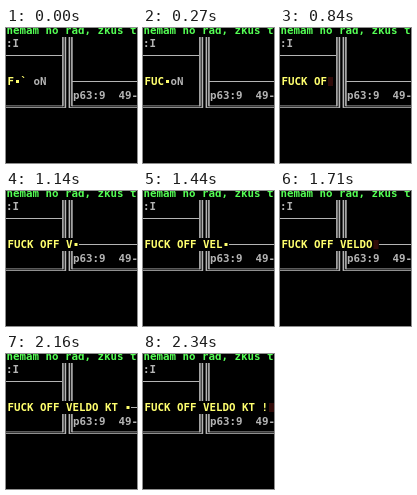
Recreate the animation shown at these times as an HTML page with a canvas. Size 131 by 135 pixels, loop 2.37 s.

```html
<!DOCTYPE html>
<html lang="en">
<head>
<meta charset="utf-8">
<style>
html, body { margin: 0; overflow: hidden; background: #000; }
canvas { display: block; }
</style>
</head>
<body>
<canvas id="screen" width="131" height="135"></canvas>
<script>
const ctx = document.getElementById('screen').getContext('2d');
const LOOP = 2370, TICK = 30, PITCH = 6.5, LEFT = 1.5;
const GRAY = '#b4b4b4', GREEN = '#55ff55', YELLOW = '#ffff6e', EMBER = '#300a08';
const MESSAGE = 'FUCK OFF VELDO KT !';
const CELLS_PER_TICK = 0.235, FIRST_CELL = 1.08;

const cellX = i => LEFT + i * PITCH;

function box(x, y, w, h, color = GRAY) {
  ctx.fillStyle = color;
  ctx.fillRect(x, y, w, h);
}

function print(text, x, baseline, color) {
  ctx.font = 'bold 10.8px "DejaVu Sans Mono", monospace';
  ctx.fillStyle = color;
  [...text].forEach((char, i) => ctx.fillText(char, x + i * PITCH, baseline));
}

function drawPanels() {
  box(0, 0, 131, 135, '#000');
  print('nemam ho rad, zkus t', 0.5, 6, GREEN);
  print(':I', 0, 19, GRAY);
  print('p63:9  49-', 67, 71, GRAY);

  box(0, 27, 56, 1);
  box(66, 53, 65, 1);
  // Double borders of the two neighbouring panels
  for (const x of [56.1, 65.1]) box(x, 9, 1.6, 69.3);
  for (const x of [58.6, 62.6]) box(x, 9, 1.6, 70.9);
  box(0, 77.5, 57, 0.8);
  box(0, 79.1, 60, 0.8);
  box(66, 77.5, 65, 0.8);
  box(63, 79.1, 68, 0.8);

  print('`', cellX(2), 57, YELLOW);
  print('oN', cellX(4), 57, GRAY);
}

// The cursor wipes the row as it advances: a bright dot that dies to an ember
function drawMessage(ticks) {
  const position = FIRST_CELL + ticks * CELLS_PER_TICK;
  const cursor = Math.floor(position);
  const x = cellX(cursor);
  box(0, 47, Math.round(x + PITCH), 13, '#000');
  print(MESSAGE.slice(0, cursor), LEFT, 57, YELLOW);
  if (position - cursor < 0.4) box(x + 2, 52, 3, 3, YELLOW);
  else box(x + 1, 49, 5, 9, EMBER);
}

function frame() {
  drawPanels();
  drawMessage(Math.floor((performance.now() % LOOP) / TICK));
  requestAnimationFrame(frame);
}
frame();
</script>
</body>
</html>
```
